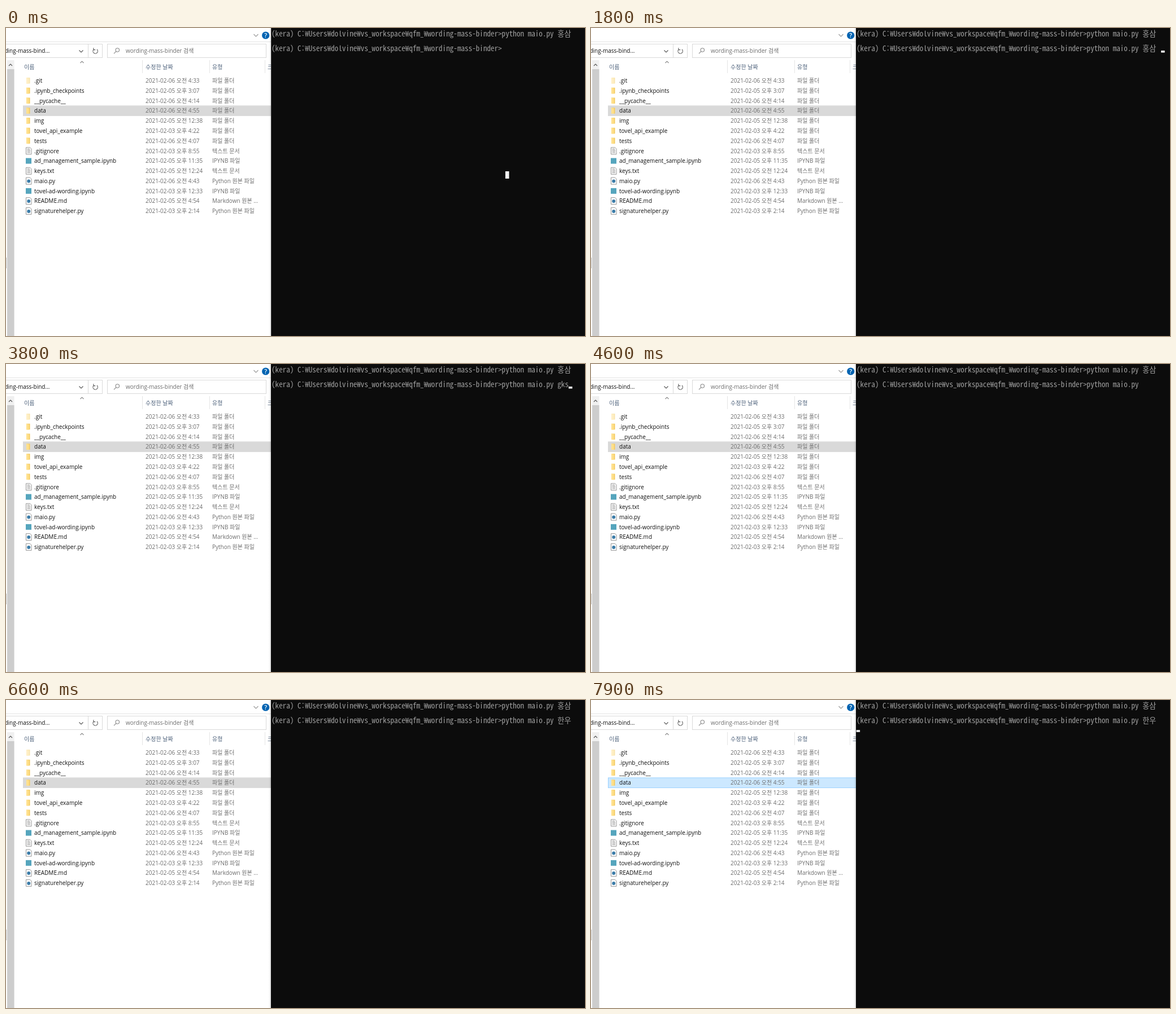
An HTML page for the animation above (8 s loop, 1025 by 546 pixels).

```html
<!DOCTYPE html>
<html lang="ko">
<head>
<meta charset="utf-8">
<title>Explorer and console</title>
<style>
  html, body { margin: 0; width: 100%; height: 100%; overflow: hidden; background: #fff; }
  svg { display: block; width: 1025px; height: 546px; }
  text { white-space: pre; }
  .ui { font: 10px "Open Sans", "Noto Sans CJK KR", sans-serif; fill: #111; }
  .ui .dim { fill: #6d6d6d; }
  .ui .head { fill: #4c607a; }
  .console { font: 13.16px "Noto Sans Mono CJK KR", "Noto Sans CJK KR", monospace; fill: #a0a0a0; }
  .line { fill: none; stroke: #555; stroke-width: 1.1; }
  .box { fill: #fff; stroke: #d9d9d9; }
</style>
</head>
<body>
<svg viewBox="0 0 1025 546">
  <defs>
    <linearGradient id="shade">
      <stop offset="0" stop-color="#000" stop-opacity="0"/>
      <stop offset="1" stop-color="#000" stop-opacity=".12"/>
    </linearGradient>
    <g id="folder">
      <path d="M1 -5.5H7.5V5H1Z" fill="#f3cc64"/>
      <path d="M1 -5.5L5.5 -4.5V5.5L1 5Z" fill="#ffe08c"/>
    </g>
    <g id="page">
      <path d="M.5 -6H7.5L10 -3.5V6H.5Z" fill="#fff" stroke="#8b8b8b" stroke-width=".9"/>
    </g>
    <g id="doc">
      <use href="#page"/>
      <path d="M2.5 -3.5H7M2.5 -1.3H8M2.5 .9H8M2.5 3.1H8" stroke="#8b8b8b" stroke-width=".9"/>
    </g>
    <g id="code">
      <use href="#page"/>
      <circle cx="5.2" cy=".5" r="3" fill="#3b7ca8"/>
    </g>
    <g id="note"><rect y="-5" width="10" height="10" fill="#55a5bd"/></g>
  </defs>

  <rect width="1025" height="546" fill="#fff"/>
  <g class="ui">
    <path d="M0 24.5H469" stroke="#e2e2e2"/>
    <path class="line" d="M438.5 11L442.5 15L446.5 11" style="stroke:#999"/>
    <circle cx="459.7" cy="13" r="6.6" fill="#0063b1"/>
    <text x="459.7" y="17" text-anchor="middle" font-weight="600" font-size="11" style="fill:#fff">?</text>

    <rect class="box" x="-5.5" y="28.5" width="151" height="24"/>
    <rect class="box" x="145.5" y="28.5" width="25" height="24"/>
    <rect class="box" x="179.5" y="28.5" width="281" height="24"/>
    <text x="77.5" y="44.3" text-anchor="end">wording-mass-bind...</text>
    <path class="line" d="M129.5 39.5L133 43L136.5 39.5"/>
    <path class="line" d="M161 38A4.2 4.2 0 1 1 155 38.3M155 35.3V38.6H158.2"/>
    <g class="line" style="stroke:#888">
      <circle cx="197.3" cy="39" r="3.2"/>
      <path d="M195 41.3L191 45.3"/>
    </g>
    <text class="dim" x="212" y="44.3">wording-mass-binder 검색</text>

    <rect x="2" y="57" width="12.5" height="489" fill="#f0f0f0"/>
    <rect x="2" y="73" width="12.5" height="473" fill="#cdcdcd"/>
    <path class="line" d="M5 67L8 64L11 67" stroke-width="1.4"/>
    <path d="M.5 407V426" stroke="#bbb"/>

    <path d="M241.5 57V80M360.5 57V80M458.5 57V80" stroke="#e5e5e5"/>
    <path class="line" d="M131.5 62L134.5 59L137.5 62" style="stroke:#888"/>
    <text class="head" x="32" y="72.5">이름</text>
    <text class="head" x="247" y="72.5">수정한 날짜</text>
    <text class="head" x="365" y="72.5">유형</text>
    <text class="head" x="463" y="72.5">크기</text>

    <rect id="selection" x="30.5" y="137.9" width="440" height="17.7"/>
    <g id="files"></g>
  </g>

  <rect id="shadow" x="465" width="4" height="546" fill="url(#shade)"/>
  <rect x="469" width="556" height="546" fill="#0c0c0c"/>
  <path id="edge" d="M469.5 0V546"/>
  <g class="console">
    <text x="470" y="15">(kera) C:₩Users₩dolvine₩vs_workspace₩qfm_₩wording-mass-binder&gt;</text>
    <text x="877.6" y="15">python maio.py 홍삼</text>
    <text x="470" y="41.4">(kera) C:₩Users₩dolvine₩vs_workspace₩qfm_₩wording-mass-binder&gt;</text>
    <text id="command" x="877.6" y="41.4"></text>
  </g>
  <rect id="cursor" width="6.5" height="3.6" fill="#f2f2f2"/>
  <rect id="block" x="884" y="254" width="6.6" height="13" fill="#f2f2f2"/>
</svg>

<script>
  const LOOP = 8000;
  const CELL = 6.58;
  const $ = id => document.getElementById(id);

  const FOLDER = "파일 폴더", TEXT = "텍스트 문서", NOTE = "IPYNB 파일", PY = "Python 원본 파일";
  const files = [
    ["folder", ".git", "06 오전 4:33", FOLDER],
    ["folder", ".ipynb_checkpoints", "05 오후 3:07", FOLDER],
    ["folder", "__pycache__", "06 오전 4:14", FOLDER],
    ["folder", "data", "06 오전 4:55", FOLDER],
    ["folder", "img", "05 오전 12:38", FOLDER],
    ["folder", "tovel_api_example", "03 오후 4:22", FOLDER],
    ["folder", "tests", "06 오전 4:07", FOLDER],
    ["doc", ".gitignore", "03 오후 8:55", TEXT],
    ["note", "ad_management_sample.ipynb", "05 오후 11:35", NOTE],
    ["doc", "keys.txt", "05 오전 12:24", TEXT],
    ["code", "maio.py", "06 오전 4:43", PY],
    ["note", "tovel-ad-wording.ipynb", "03 오후 12:33", NOTE],
    ["code", "README.md", "05 오전 4:54", "Markdown 원본 ..."],
    ["code", "signaturehelper.py", "03 오후 2:14", PY],
  ];
  $("files").innerHTML = files.map(([icon, name, date, type], i) => {
    const y = 93.5 + i * 17.76;
    const base = y + 3.7;
    return `<use href="#${icon}" x="35" y="${y}" opacity="${name === ".git" ? 0.5 : 1}"/>
      <text x="50" y="${base}">${name}</text>
      <text class="dim" x="247" y="${base}">2021-02-${date}</text>
      <text class="dim" x="365" y="${base}">${type}</text>`;
  }).join("");

  // Each step: start time, typed text, cursor column after the prompt (null = hidden).
  const RUN = "python maio.py ";
  const DONE = RUN + "한우";
  const NEXT_LINE = -62;
  const steps = [
    [0, "", null],
    [1300, "", 0],
    [1800, RUN + "홍삼 ", 20],
    [2200, RUN + "홍삼 ", null],
    [2300, RUN + "홍삼", 19],
    [2500, RUN + "홍", 17],
    [2700, RUN, null],
    [3200, RUN, 15],
    [3500, RUN + "g", 16],
    [3600, RUN + "gk", 17],
    [3700, RUN + "gks", null],
    [3800, RUN + "gks", 18],
    [4200, RUN + "gk", 17],
    [4300, RUN + "g", 16],
    [4500, RUN, 15],
    [4600, RUN, null],
    [5100, RUN + "한", null],
    [5600, DONE, null],
    [6100, DONE + " ", 20],
    [6600, DONE + " ", null],
    [7000, DONE, NEXT_LINE],
    [7100, DONE, null],
    [7600, DONE, NEXT_LINE],
  ];

  const show = (el, on) => el.setAttribute("visibility", on ? "visible" : "hidden");

  function draw(t) {
    const [, typed, column] = steps.findLast(step => step[0] <= t);
    $("command").textContent = typed;
    show($("cursor"), column !== null);
    if (column !== null) {
      $("cursor").setAttribute("x", 877.6 + column * CELL);
      $("cursor").setAttribute("y", column === NEXT_LINE ? 53.2 : 40);
    }
    show($("block"), t < 1800);

    const focused = t >= 800;
    $("shadow").setAttribute("opacity", focused ? 1 : 0.6);
    $("edge").setAttribute("stroke", focused ? "#0c0c0c" : "#3a3a3a");

    const active = t >= 7900;
    $("selection").setAttribute("fill", active ? "#cce8ff" : "#d9d9d9");
    $("selection").setAttribute("stroke", active ? "#99d1ff" : "#d9d9d9");
  }

  const start = performance.now();
  function tick() {
    draw((performance.now() - start) % LOOP);
    requestAnimationFrame(tick);
  }
  tick();
</script>
</body>
</html>
```
